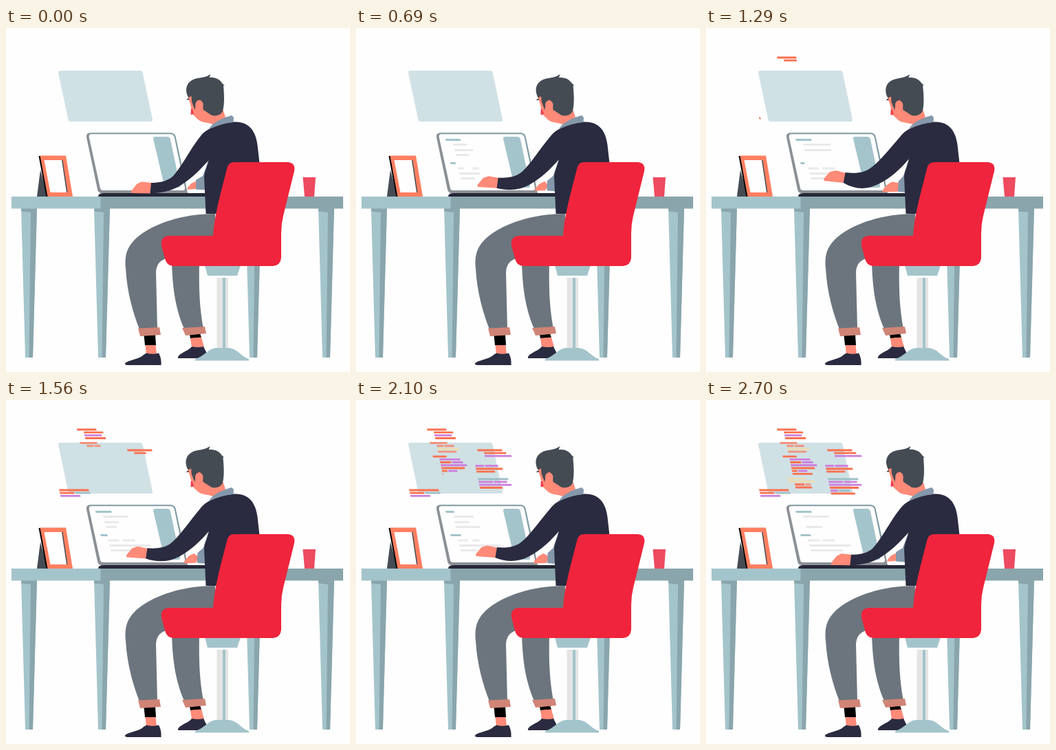
Recreate the animation shown at these times as an HTML page. Size 500x500 px, loop 2.73 s.

```html
<!DOCTYPE html>
<html lang="en">
<head>
<meta charset="utf-8">
<title>Desk work</title>
<style>
html, body { margin: 0; width: 100%; height: 100%; overflow: hidden; background: #fefefe; }
svg { display: block; width: 100vw; height: 100vh; }
.light { fill: #a4c4cb; } .dark { fill: #8aa5ac; } .navy { fill: #2a2b40; }
.skin { fill: #ff8a78; } .red { fill: #f0243c; } .pants { fill: #6c757d; }
.cuff { fill: #d08476; } .shirt { fill: #8497ab; } .hair { fill: #454b53; }
</style>
</head>
<body>
<svg viewBox="0 0 500 500">
  <defs>
    <g id="leg">
      <path class="light" d="M0 0H23L17 217H6Z"/>
      <path class="dark" d="M0 0H23L17 217H11.5L14 6L.3 4.5Z"/>
    </g>
  </defs>

  <path fill="#d0e1e5" d="M79 62H195Q198 62 198.600 65L213 133Q213.500 136 210 136H94Q91 136 90.300 133L76 65Q75.500 62 79 62Z"/>
  <g id="code"></g>

  <use href="#leg" x="22" y="262"/>
  <use href="#leg" x="128" y="262"/>
  <use href="#leg" x="348" y="262"/>
  <use href="#leg" x="454" y="262"/>
  <path class="light" d="M8 245H138V262.500H8Z"/>
  <path class="dark" d="M137.500 245H490V262.500H137.500Z"/>

  <path class="hair" d="M50 206L45 245H60Z"/>
  <path fill="#000" d="M47.500 186H51L62 245H58.500Z"/>
  <path fill="#ff7f60" d="M49.500 185.500H87L97 245H60.500Z"/>
  <path class="hair" d="M80 192H82.500L89.500 239H86Z"/>
  <path fill="#fefefe" d="M55.500 192H81L88 239H64.500Z"/>
  <path fill="#ee4a60" d="M431.500 217H450L448 245H434Z"/>

  <path fill="#8b9096" d="M122 152.500H239Q245 152.500 246.500 158L264 240H139Q134.500 240 133.300 236L117 159Q116 152.500 122 152.500Z"/>
  <path fill="#7d9ca2" d="M119 154Q120 152.500 122 152.500H239Q245 152.500 246.500 158L262 230L250 200L240 154Z"/>
  <path fill="#fefefe" d="M124 154.200H239Q243.500 154.200 244.800 159L260 232Q260.500 236 257 236H141Q137.800 236 137 233L120.800 159Q120 154.200 124 154.200Z"/>
  <path class="light" d="M217 158H234Q238 158 239 162L253 229Q253.500 232 250 232H233Q230.500 232 230 229L214 161Q213.500 158 217 158Z"/>
  <g id="page"></g>
  <path fill="#252738" d="M134 245Q134 240 142 240H290V245Z"/>

  <path class="pants" d="M241 340C242 380 247 410 259 437L287 437C282 410 280 385 281 340Z"/>
  <path d="M267 446L282 444L284 450L268 451Z"/>
  <path class="skin" d="M268 451L284 449.500L288 464L270 465Z"/>
  <path class="cuff" d="M256 436L289 434L291 444L261 447Z"/>
  <path class="navy" d="M250 480C249 473 265 470 270 463Q279 465 287 463L292 473L284 480Z"/>

  <path class="light" d="M289 345H341L336 360H293Z"/>
  <path fill="#e4e4e4" d="M306.500 363H323V467H306.500Z"/>
  <path class="light" d="M315 363H319V467H315Z"/>
  <path class="light" d="M275 483.500V481C291 476 293 465 308 465H321C337 465 339 476 353 481V483.500Z"/>

  <path class="pants" d="M304 270C255 270 216 285 196 300C176 315 172 329 174 350C176 385 185 415 194 438H220L218 356Q218 338 236 334H304Z"/>
  <path d="M200.500 447L217 446L218 461H202Z"/>
  <path class="skin" d="M202.500 461H217.500L219 474L204 475Z"/>
  <path class="cuff" d="M192 436.500L223 435L225 446L195 448Z"/>
  <path class="navy" d="M173 489C172 483 192 483 200 475L204 472.500Q213 475 222 472.500C225 478 226 484 225.500 490H176Z"/>

  <path id="farHand" class="skin"/>
  <path id="farArm" class="shirt"/>
  <path class="navy" d="M290.500 270L288 217C288 208 294 200 295 188L283 157C291 146 310 139 328 137C352 134 363 149 365.500 170L370 210L340 270Z"/>
  <path id="hand" class="skin"/>
  <path id="arm" class="navy"/>

  <g id="head">
    <path class="skin" d="M264.500 100L269 96L288 104L316 120L319 130L303 141C295 137 284 138 279 133L271 125L268 111Z"/>
    <path fill="#ee3b4a" d="M269 117L268.500 126L273 125L271 118Z"/>
    <path class="hair" d="M265 101C260 92 261 81 270 76C278 71 288 74 297.500 67L295.500 72C304 71 311 75 314 80L318 84L316 83.500C317 95 318 110 315 121C311 128 304 128 299 127L287 119L282 104L276 109L274.500 119L270 107L269.500 99Z"/>
    <path class="skin" d="M275.500 110C277 103 285 104 286.500 110C287 116 286 123 281 121C277 119 275 115 275.500 110Z"/>
    <path d="M262 104.500L265.500 102L266 104Z"/>
  </g>
  <path class="shirt" d="M295 147C299 138 313 131 328 127L331 130L330.500 137C318 138 307 142 295 147Z"/>
  <path class="red" d="M331 195H410Q421 196 419 208L403 273Q400 285 400 298V334Q399 345 388 346H243Q233 345 231 335L226 316Q224 303 237 302H301C303 270 313 237 321 205Q323 195 331 195Z"/>
</svg>

<script>
const LOOP = 2730, STROKE = LOOP / 3, ROW = 65.5;
const $ = id => document.getElementById(id);

const poses = {
  arm: [
    "M283 157C268 175 255 203 242 216C234 223 222 225 211 225L209.500 240.500C228 240 245 235 255 228C272 217 283 205 295 192L320 150Z",
    "M283 157C265 178 250 196 237 204C228 210 214 211 202 209L199 224C215 234 232 236 250 227C270 217 282 205 295 190L320 150Z"],
  hand: [
    "M182 240L182 237L190 227L197 223.500L212 225L210 240.500Z",
    "M171 221L170.500 218L179 208L188 206L203 210L199.500 224Z"],
  farHand: [
    "M263 234.500L264 232L269 226L278 222L278 233.500L270 234.500Z",
    "M256 239L257.500 234L264 227L270 223.500L282 225L280 238Z"],
  farArm: [
    "M276 221L286 215L294 193L296 236L276 234.500Z",
    "M280 223L287 215L294 193L296 240L279 238Z"]
};

// x, y, then width at each of the times below
const times = [0, 420, 960, 1290, 1860, 2370, 2700];
const lines = [
  [130, 161, 0, 23, 20, 23, 23, 0, 23],
  [141, 168, 0, 40, 0, 40, 32, 27, 37],
  [143, 176, 0, 19, 35, 39, 0, 45, 0],
  [145, 183, 0, 0, 37, 0, 32, 37, 24],
  [137, 195, 0, 0, 15, 6, 15, 15, 15],
  [148, 202.5, 0, 0, 17, 16, 17, 12, 17],
  [169, 202.5, 0, 0, 18, 18, 18, 2, 18],
  [150, 210, 0, 0, 60, 60, 60, 60, 60],
  [152, 217, 0, 0, 41, 46, 46, 0, 46]
];

// Each row: optional indent ">", then colour letter and width; "/" is a blank gap
const colors = { o: "#f9714f", p: "#cc7fdd", t: "#9fbfc8", s: "#f0937e", y: "#ebdcb2" };
const blocks = [
  { x: 103, y: 41.5, start: 1182, rows: "o28 >o28 >p25 >o30 / s25 >s10,s14 >y32 >s27 / o20 >p30 >o16,p16 >p38 >o34 >o8,p13 >o29 / y26 y39 >o14,s8 >o24" },
  { x: 176, y: 71.5, start: 1460, rows: "o36 >o32 >p39" },
  { x: 173, y: 94.3, start: 1460 + 3 * ROW, rows: "p13,p19 o39 o27" },
  { x: 177, y: 113.5, start: 1460 + 6 * ROW, rows: "t44 p21,p19 p47 o42 p11,t16 o35" },
  { x: 77, y: 129.5, start: 1288, rows: "o43 o21,t22 p29" }
];

function bar(parent, color) {
  const p = document.createElementNS("http://www.w3.org/2000/svg", "path");
  p.setAttribute("fill", color);
  return parent.appendChild(p);
}
const setBar = (p, x, y, w) =>
  p.setAttribute("d", w > 0.2 ? `M${x} ${y}h${w}l.7 2.9h${-w}z` : "");

const pageBars = lines.map(([x]) => bar($("page"), x === 130 || x === 137 ? "#a4c4cb" : "#e9e9ea"));

const codeBars = [];
for (const { x, y, start, rows } of blocks) {
  let dy = 0, at = start;
  for (const row of rows.split(" ")) {
    if (row === "/") { dy += 2.8; continue; }
    let left = x + dy * 0.21 + (row[0] === ">" ? 9 : 0), offset = 0;
    const parts = row.replace(">", "").split(",").map(s => [colors[s[0]], +s.slice(1)]);
    const total = parts.reduce((sum, part) => sum + part[1], 0);
    for (const [color, w] of parts) {
      codeBars.push({ el: bar($("code"), color), x: left, y: y + dy, w, offset, total, at });
      left += w + 1.3;
      offset += w;
    }
    dy += 4.2;
    at += ROW;
  }
}

function mix(a, b, k) {
  const end = b.match(/[\d.]+/g);
  let i = 0;
  return a.replace(/[\d.]+/g, n => (+n + (end[i++] - n) * k).toFixed(2));
}

function widthAt(t, values) {
  let i = 0;
  while (i < times.length - 2 && t >= times[i + 1]) i++;
  const k = Math.min(1, (t - times[i]) / (times[i + 1] - times[i]));
  return values[i] + (values[i + 1] - values[i]) * k;
}

function draw(t) {
  const k = (1 - Math.cos(t / STROKE * 2 * Math.PI)) / 2;
  for (const id in poses) $(id).setAttribute("d", mix(...poses[id], k));
  $("head").setAttribute("transform", `rotate(${-1.2 * k} 305 132)`);

  lines.forEach(([x, y, ...widths], i) => setBar(pageBars[i], x, y, widthAt(t, widths)));
  for (const b of codeBars) {
    const typed = (t - b.at) / ROW * b.total - b.offset;
    setBar(b.el, b.x, b.y, Math.max(0, Math.min(b.w, typed)));
  }
}

const begin = performance.now();
function tick() {
  draw((performance.now() - begin) % LOOP);
  requestAnimationFrame(tick);
}
tick();
</script>
</body>
</html>
```
